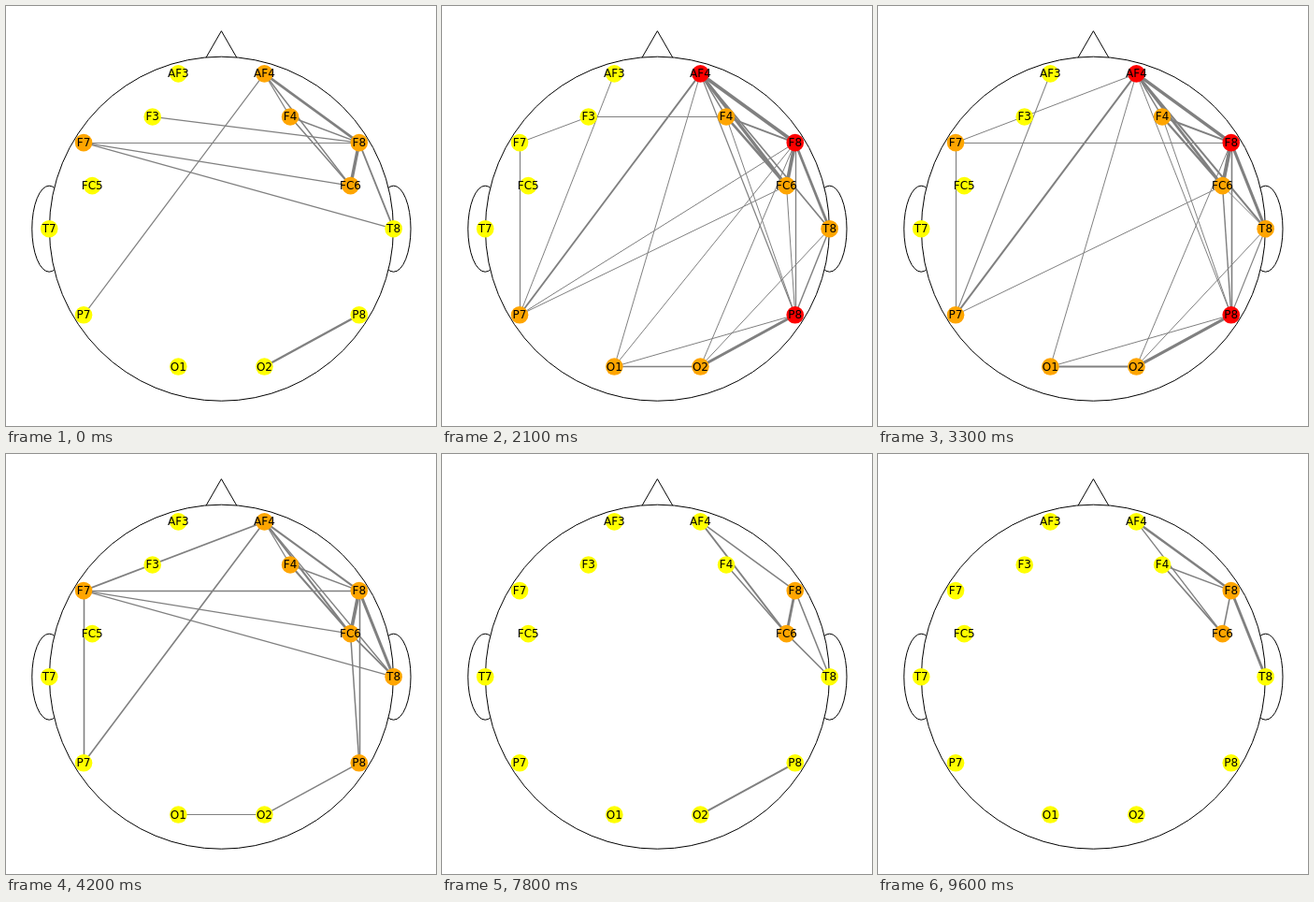
Animation, 460 px wide and 449 px high, one loop 9900 ms. Source, as an HTML page:

```html
<!DOCTYPE html>
<html lang="en">
<head>
<meta charset="utf-8">
<title>Electrode network</title>
<style>
  html, body { margin: 0; width: 100%; height: 100%; overflow: hidden; background: #fff; }
  svg { display: block; width: 100vw; height: 100vh; }
  .outline { fill: #fff; stroke: #000; stroke-width: 1; }
  #edges { stroke: #808080; }
  text { font: 12px "DejaVu Sans", sans-serif; text-anchor: middle; }
</style>
</head>
<body>
<svg viewBox="0 0 460 449">
  <g class="outline">
    <ellipse cx="46.2" cy="238.2" rx="18.4" ry="46"/>
    <ellipse cx="414.6" cy="238.2" rx="18.4" ry="46"/>
    <path d="M213.8 55.5 L230.4 26.7 L247 55.5"/>
    <circle cx="230.4" cy="238.2" r="184"/>
  </g>
  <g id="edges"></g>
  <g id="nodes"></g>
  <g id="labels"></g>
</svg>
<script>
const STEP = 300, STEPS = 33;
const CX = 230.4, CY = 238.2, R = 184.2;

// Electrode positions on the unit head.
const sites = {
  AF3: [-.25, .9], AF4: [.25, .9], F3: [-.4, .65], F4: [.4, .65],
  F7: [-.8, .5], F8: [.8, .5], FC5: [-.75, .25], FC6: [.75, .25],
  T7: [-1, 0], T8: [1, 0], P7: [-.8, -.5], P8: [.8, -.5],
  O1: [-.25, -.8], O2: [.25, -.8]
};

// Links at key steps; a link without a width is thin.
const keys = {
  0: 'AF4-F8:2.6 AF4-F4 AF4-FC6:1.5 AF4-P7 F4-F8:1.5 F4-FC6:1.5 F3-F8 F7-F8 F7-FC6 F7-T8 F8-FC6:3.4 F8-T8:1.8 O2-P8:2.4',
  4: 'AF4-F8:3.6 AF4-F4:1.5 AF4-FC6:4 AF4-P7:1.9 AF4-F3:1.6 AF4-T8 AF4-P8 F3-F7:1.4 F3-F4 F3-FC6 F4-F7 F4-F8:1.7 F4-FC6:2.4 F7-F8:1 F7-P7:1.5 F8-FC6:3.8 F8-T8:1.9 F8-P8:1 T8-P8:1.4 O2-P8:1.9',
  9: 'AF4-F8:4 AF4-F4:1.5 AF4-FC6:2.8 AF4-P7:2.1 AF4-T8:2.2 AF4-P8:1.5 AF4-O1 AF3-P7:1.5 F4-F8:2.1 F4-FC6:2.4 F4-P8 F7-P7:1 F8-FC6:3.8 F8-T8:3.2 F8-P8:1.6 F8-P7 F8-O1 F8-O2 FC6-P7 FC6-P8 T8-P8:1.6 T8-O2 O1-P8:1.4 O1-O2:2.8 O2-P8:4',
  14: 'AF4-F8:2 AF4-F4 AF4-FC6:2.1 AF4-P7:1.6 AF4-T8:1.4 AF4-F7:1.7 F4-F8:1.5 F4-FC6:2 F7-F8:1.5 F7-FC6 F7-T8 F7-P7:1.6 F8-FC6:3.6 F8-T8:3 F8-P8:1.6 FC6-P8:1.5 FC6-T8:1.8 O1-O2:1 O2-P8:1.5',
  19: 'F4-F8 F8-FC6:2.2 F8-T8:1.4 O1-O2:1.6 O2-P8:2.1',
  23: 'AF4-F8:1.6 AF4-FC6 AF4-F4 F4-FC6 F7-F8 F8-FC6:2.6 F8-T8:1.4 O1-O2 O2-P8:2',
  26: 'AF4-F8:1.5 AF4-FC6:1.8 F4-FC6:1.5 F8-FC6:2.8 F8-T8:1.5 FC6-T8:1.5 O2-P8:2',
  30: 'AF4-F8:2.2 AF4-F4 AF4-FC6:1.5 F4-F8 F4-FC6:1.5 F7-F8 F7-FC6 F7-T8 F8-FC6:2.4 F8-T8:2.2 FC6-T8',
  32: 'AF4-F8:2.5 AF4-FC6:1.4 F4-F8:1.4 F4-FC6:1.7 F8-FC6:1.6 F8-T8:2.8'
};

const parse = text => Object.fromEntries(text.split(' ').map(item => {
  const [link, width = 1.2] = item.split(':');
  return [link, +width];
}));
const stops = Object.keys(keys).map(k => ({ at: +k, links: parse(keys[k]) }));
const linkNames = [...new Set(stops.flatMap(s => Object.keys(s.links)))];

const pos = {};
for (const name in sites) {
  const [x, y] = sites[name];
  pos[name] = [CX + x * R, CY - y * R];
}

function add(parent, tag, attrs) {
  const el = document.createElementNS('http://www.w3.org/2000/svg', tag);
  for (const key in attrs) el.setAttribute(key, attrs[key]);
  return document.getElementById(parent).appendChild(el);
}

const lines = linkNames.map(link => {
  let [[x1, y1], [x2, y2]] = link.split('-').map(n => pos[n]);
  if (Math.abs(x1 - x2) < .01) x1 = x2 = Math.round(x1) + .5;
  if (Math.abs(y1 - y2) < .01) y1 = y2 = Math.floor(y1) + .5;
  return add('edges', 'line', { x1, y1, x2, y2 });
});

const dots = {};
for (const name in pos) {
  const [x, y] = pos[name];
  dots[name] = add('nodes', 'circle', { cx: x, cy: y, r: 9.3 });
  add('labels', 'text', { x, y: Math.round(y + 4) }).textContent = name;
}

function noise(a, b) {
  const v = Math.sin(a * 12.9898 + b * 78.233) * 43758.5453;
  return v - Math.floor(v) - .5;
}

function widthAt(step, link, i) {
  const next = stops.findIndex(s => s.at >= step);
  const b = stops[next], to = b.links[link] || 0;
  if (b.at === step) return to;
  const a = stops[next - 1], from = a.links[link] || 0;
  if (!from && !to) return 0;
  const mix = (step - a.at) / (b.at - a.at);
  const w = from + (to - from) * mix + noise(step, i) * .4;
  return w > .55 ? Math.max(w, 1) : 0;
}

// A node's colour follows its number of links.
const colour = n => n >= 7 ? '#ff0000' : n >= 3 ? '#ffa500' : '#ffff00';

function draw(step) {
  const degree = {};
  linkNames.forEach((link, i) => {
    const w = widthAt(step, link, i);
    lines[i].setAttribute('stroke-width', w);
    lines[i].setAttribute('visibility', w ? 'visible' : 'hidden');
    if (w) for (const n of link.split('-')) degree[n] = (degree[n] || 0) + 1;
  });
  for (const name in dots) dots[name].setAttribute('fill', colour(degree[name] || 0));
}

let shown = -1;
function tick() {
  const step = Math.floor(performance.now() / STEP) % STEPS;
  if (step !== shown) draw(shown = step);
  requestAnimationFrame(tick);
}
tick();
</script>
</body>
</html>
```
